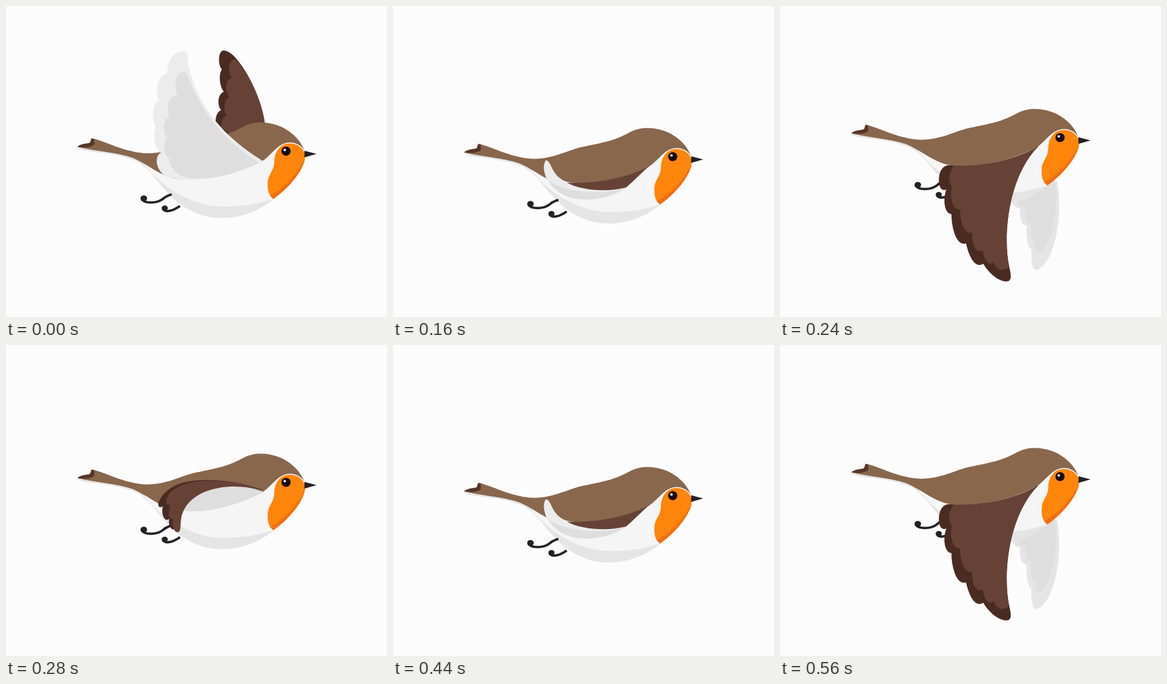
Animation, 600 px wide and 490 px high, one loop 600 ms. Source, as an HTML page:

```html
<!DOCTYPE html>
<html lang="en">
<head>
<meta charset="utf-8">
<title>Flying robin</title>
<style>
  html, body { margin: 0; width: 100%; height: 100%; overflow: hidden; background: #fcfcfc; }
  svg { display: block; width: 600px; height: 490px; }
  .pose { visibility: hidden; }
  .pose.on { visibility: visible; }
  .brown { fill: #88674d; }
  .wing { fill: #664236; }
  .tips { fill: #4a2b22; }
  .white { fill: #f5f5f5; }
  .pale { fill: #ececec; }
  .grey { fill: #dedede; }
  .shade { fill: #e5e5e5; }
  .ink { fill: #222226; }
  .leg { fill: none; stroke: #222226; stroke-width: 3.8; }
</style>
</head>
<body>
<svg viewBox="0 0 600 490">
  <defs>
    <g id="body">
      <path class="shade" d="M110 223C118 231 165 229 200 242.500C222 250 236 275 252 291C275 318 305 334 340 334C372 334 400 322 422 304C446 284 466 258 471 238L404 244L260 262L195 234Z"/>
      <path class="white" d="M216 247C240 281 290 316 342 316C372 316 400 312 422 303C446 283 470 255 471 238C470 222 460 214.5 447 214.5C428 215 418 236 404 244C350 268 290 280 250 262Z"/>
      <path class="brown" d="M112 222C118 217 126 217 131 216C134 215 133 211 135 208.500L140 209.500C165 217 190 231 222 232C255 232 275 218 300 213C330 207 350 203 370 192C382 185 392 183.500 402 183.500C438 184 463 207 471 230C468 222 459 215 447 215C428 215 418 236 404 244C355 270 300 276 268 272C240 267 225 250 199 239C172 230 140 229 112 222Z"/>
      <path fill="#553628" d="M113 221.500C118 217 126 217 131 216C134 215 133 211 135 208.500L139 209.500C138 214 141 217 137 220C130 223 120 224 113 221.500Z"/>
      <path fill="#ff850b" d="M446 216.500C432 217 423 229 422.500 245C422 262 412 264 412 281C412 294 415 299 421 304C446 287 473 255 471 234C468 223 459 216.500 446 216.500Z"/>
      <path fill="#f46c18" d="M416 299C440 285 459 265 470.500 241C467 260 444 288 421 304Z"/>
      <path class="ink" d="M470 228L489 233L470 238.500Z"/>
      <circle cx="441" cy="228.700" r="7.200" fill="#1a0a06"/>
      <circle cx="439" cy="226.800" r="2" fill="#fff"/>
      <path class="leg" d="M213.500 304C218 311 236 312 247 304Q253 298.500 261 297M247 319.500C251 326 263 323 274 315"/>
      <ellipse class="ink" cx="217" cy="303" rx="5.200" ry="4.500"/>
      <ellipse class="ink" cx="250" cy="318.500" rx="4.800" ry="4.200"/>
    </g>
  </defs>

  <!-- wings raised -->
  <g class="pose">
    <path class="tips" d="M343 70C334 70 333 92 340 100C334 108 337 128 343 135C332 140 333 158 339 164C333 166 330 174 330 182L348 205L408 188C404 150 382 104 360 80Q350 70 343 70Z"/>
    <path class="wing" d="M361 84C350 84 349 105 356 113C344 117 345 135 352 143C342 148 342 166 348 173C341 174 339 184 339 192L360 205L408 188C404 150 382 106 361 84Z"/>
    <use href="#body"/>
    <path class="pale" d="M278 71C264 71 253 89 254 106C238 110 234 135 241 149C229 152 230 181 236 192C231 203 234 225 244 231C234 236 234 258 253 269C305 282 360 267 404 244C342 205 302 159 287 92C286 82 288 71 278 71Z"/>
    <path class="grey" d="M279 104C266 105 264 127 270 141C254 141 252 162 257 175C246 179 248 201 254 209C246 216 247 235 258 241C256 252 267 266 286 271C325 275 365 264 398 247C345 213 306 166 288 113Q285 104 279 104Z"/>
  </g>

  <!-- wings level, moving down -->
  <g class="pose">
    <use href="#body" x="-.5" y="8.700"/>
    <path class="grey" d="M241 270C255 296 278 305 303 305C330 305 350 298 368 286L300 282Z"/>
    <path class="pale" d="M241 243C235 249 238 264 242 272C262 293 330 300 368 286L280 279C260 274 253 262 248 250Q244 243 241 243Z"/>
    <path class="wing" d="M274 278.500C320 280 370 271 404 252C393 261 380 275 367 286C335 294 295 290 274 278.500Z"/>
  </g>

  <!-- wings lowered -->
  <g class="pose">
    <path class="shade" d="M362 296C365 312 370 320 378 318C377 334 380 346 388 346C388 366 390 380 396 384C395 400 397 416 404 416C428 410 448 342 436 275Z"/>
    <path class="grey" d="M370 300C374 314 380 320 386 315C385 332 389 345 395 341C394 358 397 373 402 371C402 383 405 391 411 388C427 374 440 322 433 275Z"/>
    <use href="#body" y="-21.300"/>
    <path class="tips" d="M270 251C253 248 248 268 251 282C253 290 258 291 262 289C257 300 257 327 270 328C270 350 278 379 293 374C297 393 307 415 320 406C328 420 344 434 356 434C366 434 364 424 361 411C351 365 358 270 407 221C365 246 310 254 270 251Z"/>
    <path class="wing" d="M274 251.500C264 263 265 279 271 284C266 299 272 324 284 320C283 336 289 361 303 357C301 375 309 391 319 385C321 399 329 412 336 403C343 419 353 418 361 411C351 365 358 270 407 221C365 246 310 254 274 251.500Z"/>
  </g>

  <!-- wings folded, moving up -->
  <g class="pose">
    <use href="#body" y="-12.300"/>
    <path class="grey" d="M278 261C310 266 360 256 405 231C360 216 305 214 278 261Z"/>
    <path class="tips" d="M406 229C360 211 305 209 275 218C253 226 244 238 240 249C239 256 243 257 247 254C244 265 249 280 257 274C255 283 260 293 266 290L275 270C286 224 350 214 406 229Z"/>
    <path class="wing" d="M406 229C360 211 310 211 285 218C266 224 257 232 253 242C251 250 255 254 259 251C254 264 256 278 263 273C261 282 264 296 271 295C276 293 274 287 276 272C286 226 350 214 406 229Z"/>
  </g>
</svg>
<script>
  const HOLD = 80, LOOP = 600, FIRST_EXTRA = 40;
  const poses = [...document.querySelectorAll('.pose')];

  function draw() {
    const t = performance.now() % LOOP;
    const step = Math.max(0, Math.floor((t - FIRST_EXTRA) / HOLD));
    poses.forEach((pose, i) => pose.classList.toggle('on', i === step % poses.length));
    requestAnimationFrame(draw);
  }
  draw();
</script>
</body>
</html>
```
